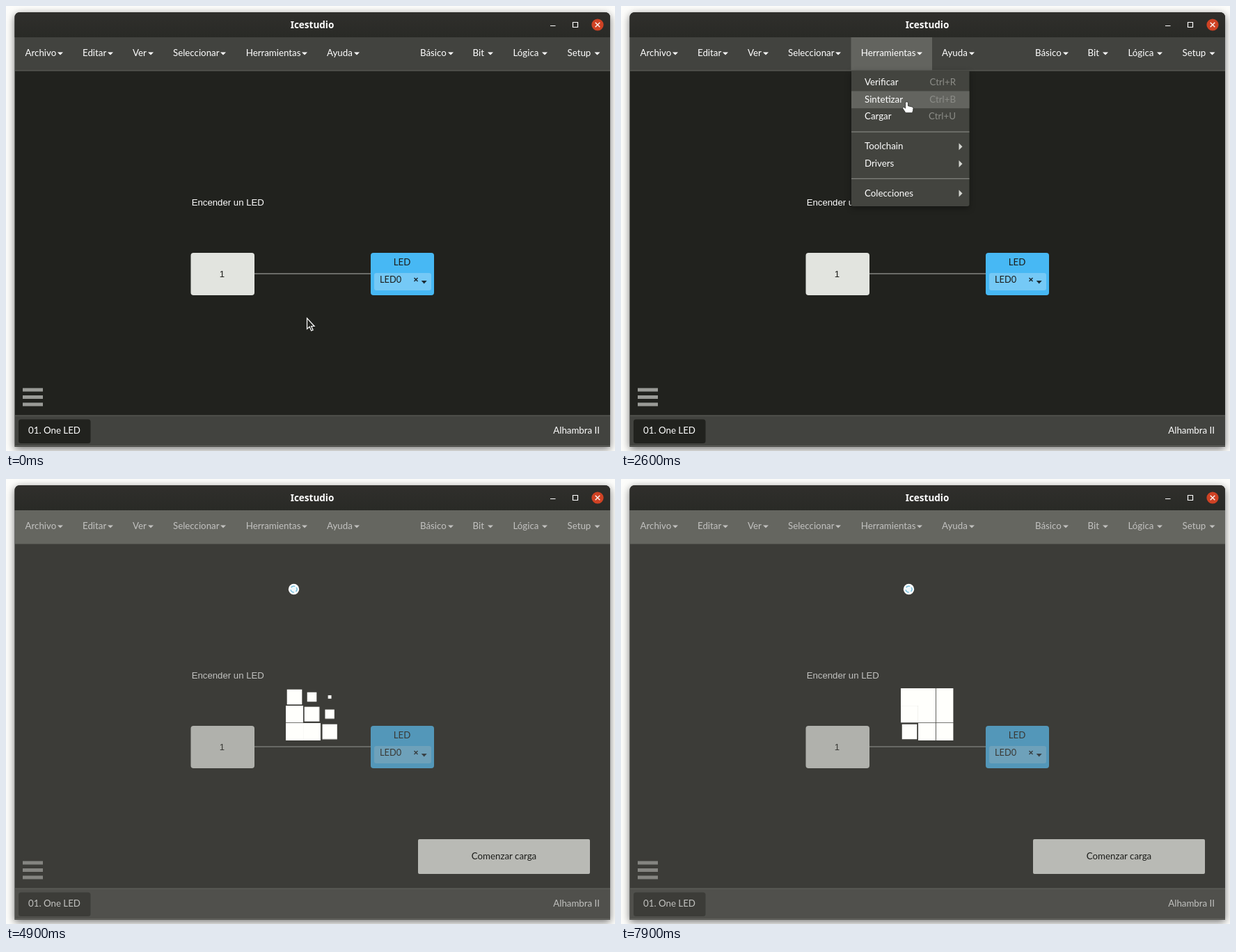
An HTML page that plays this animation: 875 px wide and 640 px high, repeating every 8000 ms.

```html
<!DOCTYPE html>
<html lang="es">
<head>
<meta charset="utf-8">
<title>Icestudio</title>
<style>
  html, body { margin: 0; width: 100%; height: 100%; overflow: hidden; background: #fdfdfb; }
  svg { display: block; width: 875px; height: 640px; }
  text { font: 13.3px Lato, sans-serif; fill: #fff; }
  .title { font: 700 13.5px "Noto Sans", sans-serif; }
  .label { font: 13.2px "Liberation Sans", Arial, sans-serif; }
  .key { fill: #8b8c87; text-anchor: end; }
  .mid { text-anchor: middle; }
  .dark { fill: #1c1d1a; }
  .window { filter: drop-shadow(0 3px 6px rgba(0, 0, 0, .55)); }
  .drop { filter: drop-shadow(0 3px 4px rgba(0, 0, 0, .35)); }
  #cubes rect { transform-box: fill-box; transform-origin: center; fill: #fffffc; }
</style>
</head>
<body>
<svg viewBox="0 0 875 640">
  <defs>
    <linearGradient id="bar" x2="0" y2="1">
      <stop stop-color="#302f2c"/><stop offset="1" stop-color="#292a26"/>
    </linearGradient>
    <clipPath id="inside"><rect x="13" y="45" width="855" height="588"/></clipPath>
  </defs>

  <path class="window" fill="#21221e" d="M12.5 634V17q0-8 8-8H860q8 0 8 8V634Z"/>
  <path fill="url(#bar)" d="M12.5 45V17q0-8 8-8H860q8 0 8 8V45Z"/>
  <text class="title mid" x="440" y="32">Icestudio</text>
  <path d="M782 28.5h7.5M814.5 23.5h7v7h-7z" fill="none" stroke="#fff" stroke-width="1.2"/>
  <circle cx="850" cy="27" r="8.6" fill="#cf4224"/>
  <path d="M846.7 23.7l6.6 6.6m0-6.6l-6.6 6.6" stroke="#fff" stroke-width="1.3"/>

  <rect id="nav" x="13" y="45" width="855" height="48" fill="#42433f"/>
  <rect x="13" y="92.5" width="855" height="1" fill="#63645f"/>
  <rect id="opened" x="330.5" y="45" width="116.5" height="47.5" fill="#63645f"/>
  <g id="heads"></g>

  <text class="label" x="266.7" y="287">Encender un LED</text>
  <rect x="356" y="384" width="169" height="2" fill="#6b6c68"/>
  <rect x="265.5" y="355" width="91.5" height="61" rx="4" fill="#e2e4df"/>
  <text class="label mid dark" x="310.5" y="390">1</text>
  <rect x="524" y="355" width="91" height="61" rx="4" fill="#47b8f4"/>
  <rect x="529" y="384" width="82" height="25" rx="3" fill="#75c9f6"/>
  <text class="mid dark" x="569" y="373">LED</text>
  <text class="dark" x="537" y="398" style="font-size:12.8px">LED0</text>
  <path d="M586.5 391l5 5m0-5l-5 5" stroke="#1c2a33" stroke-width="1.5"/>
  <path d="M596.7 395h8l-4 4.5z" fill="#1c2a33"/>

  <path d="M24 549.5h29v5H24zM24 560h29v5H24zM24 570.5h29v5H24z" fill="#9a9b97"/>
  <rect x="13" y="589" width="855" height="45" fill="#42433f"/>
  <path d="M13 589h855M13 632.5h855" stroke="#63645f"/>
  <rect x="18" y="594.5" width="103.5" height="34.5" rx="3.5" fill="#21221e"/>
  <text x="32" y="615">01. One LED</text>
  <text x="853" y="615" text-anchor="end">Alhambra II</text>

  <g id="menu">
    <path class="drop" fill="#43443f" d="M331 93H500.5V285q0 3-3 3H334q-3 0-3-3Z"/>
    <rect id="hover" x="331" width="169.5" height="24.7" fill="#63645f"/>
    <path d="M331 181h169.5M331 248.3h169.5" stroke="#92938e"/>
  </g>

  <rect id="shade" x="13" y="45" width="855" height="589" fill="#64645f" opacity=".4"/>
  <g id="cubes"></g>
  <g clip-path="url(#inside)">
    <g id="notice">
      <rect x="592" y="518" width="247" height="50" rx="2" fill="#b9bab5"/>
      <text class="mid dark" x="715.5" y="547">Comenzar carga</text>
    </g>
  </g>

  <path id="arrow" d="M0 0V15.5L3.6 12.3 6.2 18 8.6 17 6.2 11.5H10.6Z" fill="#252622" stroke="#fff" stroke-width="1.2"/>
  <path id="hand" d="M-2 2a2 2 0 0 1 4 0V6l5.6 1.3q1.9 .5 1.9 2.4L9 13 8 16H-1.5L-5.6 9.8q-.8-1.6 .9-2 1-.1 1.9 .9L-2 9.6Z" fill="#fff" stroke="#33342f" stroke-width=".9"/>
  <g id="wait">
    <circle r="7.7" fill="#fff"/>
    <circle id="ring" r="4.5" fill="#f0f8fb" stroke="#74bedd" stroke-width="1.5" stroke-dasharray="6.4 3.02"/>
  </g>
</svg>
<script>
const LOOP = 8000, STEP = 100, OPEN = 1600, WAIT = 3900, BUSY = 4000, NOTICE = 4050;
const $ = id => document.getElementById(id);
const show = (id, on) => $(id).style.display = on ? '' : 'none';

function add(parent, tag, attrs, text = '') {
  const el = document.createElementNS('http://www.w3.org/2000/svg', tag);
  for (const k in attrs) el.setAttribute(k, attrs[k]);
  el.textContent = text;
  return $(parent).appendChild(el);
}

// label, text x, caret x
[['Archivo', 27.5, 74], ['Editar', 110, 146], ['Ver', 182, 204], ['Seleccionar', 240, 308],
 ['Herramientas', 344.7, 425], ['Ayuda', 461, 500], ['Básico', 595, 635], ['Bit', 670.5, 692],
 ['Lógica', 728.5, 770], ['Setup', 806.5, 845.5]].forEach(([name, x, caret]) => {
  add('heads', 'text', { x, y: 72.3 }, name);
  add('heads', 'path', { d: `M${caret} 66.5h8l-4 4z`, fill: '#fff' });
});

// label, baseline, shortcut
[['Verificar', 114, 'Ctrl+R'], ['Sintetizar', 138.7, 'Ctrl+B'], ['Cargar', 163.4, 'Ctrl+U'],
 ['Toolchain', 206.3], ['Drivers', 231], ['Colecciones', 273.5]].forEach(([name, y, key]) => {
  add('menu', 'text', { x: 350, y }, name);
  if (key) add('menu', 'text', { x: 481, y, class: 'key' }, key);
  else add('menu', 'path', { d: `M485.5 ${y - 9}l5 5-5 5z`, fill: '#d4d5d0' });
});

const paused = (el, frames, timing) => {
  const anim = el.animate(frames, timing);
  anim.pause();
  return anim;
};

const cols = [402, 427, 452.8], rows = [301, 326, 351];
const cubes = [];
rows.forEach((y, r) => cols.forEach((x, c) => {
  const el = add('cubes', 'rect', { x, y, width: c < 2 ? 25 : 24.6, height: r == 1 ? 24.3 : 25 });
  cubes.push(paused(el, [
    { transform: 'scale(1)', offset: 0, easing: 'ease-in-out' },
    { transform: 'scale(0)', offset: .35, easing: 'ease-in-out' },
    { transform: 'scale(1)', offset: .7 },
    { transform: 'scale(1)', offset: 1 }
  ], { duration: 1300, delay: 100 * (2 - r + c), iterations: Infinity }));
}));

const slide = paused($('notice'), [
  { transform: 'translateX(290px)', opacity: 0 },
  { transform: 'none', opacity: 1 }
], { duration: 500, easing: 'cubic-bezier(.175,.885,.32,1.275)', fill: 'both' });

// time, pointer x, pointer y
const path = [[0, 432.5, 449], [500, 432.5, 449], [900, 422, 232], [1000, 422, 232],
  [1400, 400, 76], [1500, 400, 76], [1700, 399.7, 71], [2000, 399.7, 71], [2900, 414.3, 161],
  [3000, 414.3, 161], [3100, 413.5, 157.3], [3400, 413.5, 157.3], [3500, 413.5, 156.5],
  [3800, 413.5, 156.5], [WAIT, 413.5, 158.5], [LOOP, 413.5, 158.5]];

function pointer(t) {
  const i = path.findIndex(p => p[0] > t);
  const [t0, x0, y0] = path[i - 1], [t1, x1, y1] = path[i];
  const u = (t - t0) / (t1 - t0), k = u * u * (3 - 2 * u);
  return [x0 + (x1 - x0) * k, y0 + (y1 - y0) * k];
}

function draw(now) {
  const t = Math.floor(now % LOOP / STEP) * STEP;
  const [x, y] = pointer(t);
  const open = t >= OPEN && t < BUSY, busy = t >= BUSY, wait = t >= WAIT;
  const link = open || y < 93;

  show('menu', open);
  show('opened', open);
  const row = Math.floor((y - 97.5) / 24.7);
  show('hover', row >= 0 && row < 3);
  $('hover').setAttribute('y', 97.7 + row * 24.7);

  show('shade', busy);
  show('cubes', busy);
  show('notice', t > NOTICE);
  $('nav').setAttribute('fill', busy ? '#666761' : '#42433f');
  if (busy) cubes.forEach(c => c.currentTime = 994 + (t - 4900) * 1.008);
  slide.currentTime = Math.max(0, t - NOTICE);

  show('arrow', !link && !wait);
  show('hand', link && !wait);
  show('wait', wait);
  for (const id of ['arrow', 'hand', 'wait']) $(id).setAttribute('transform', `translate(${x} ${y})`);
  $('ring').setAttribute('transform', `rotate(${t * .36})`);
}

const start = performance.now();
(function tick() {
  draw(performance.now() - start);
  requestAnimationFrame(tick);
})();
</script>
</body>
</html>
```
